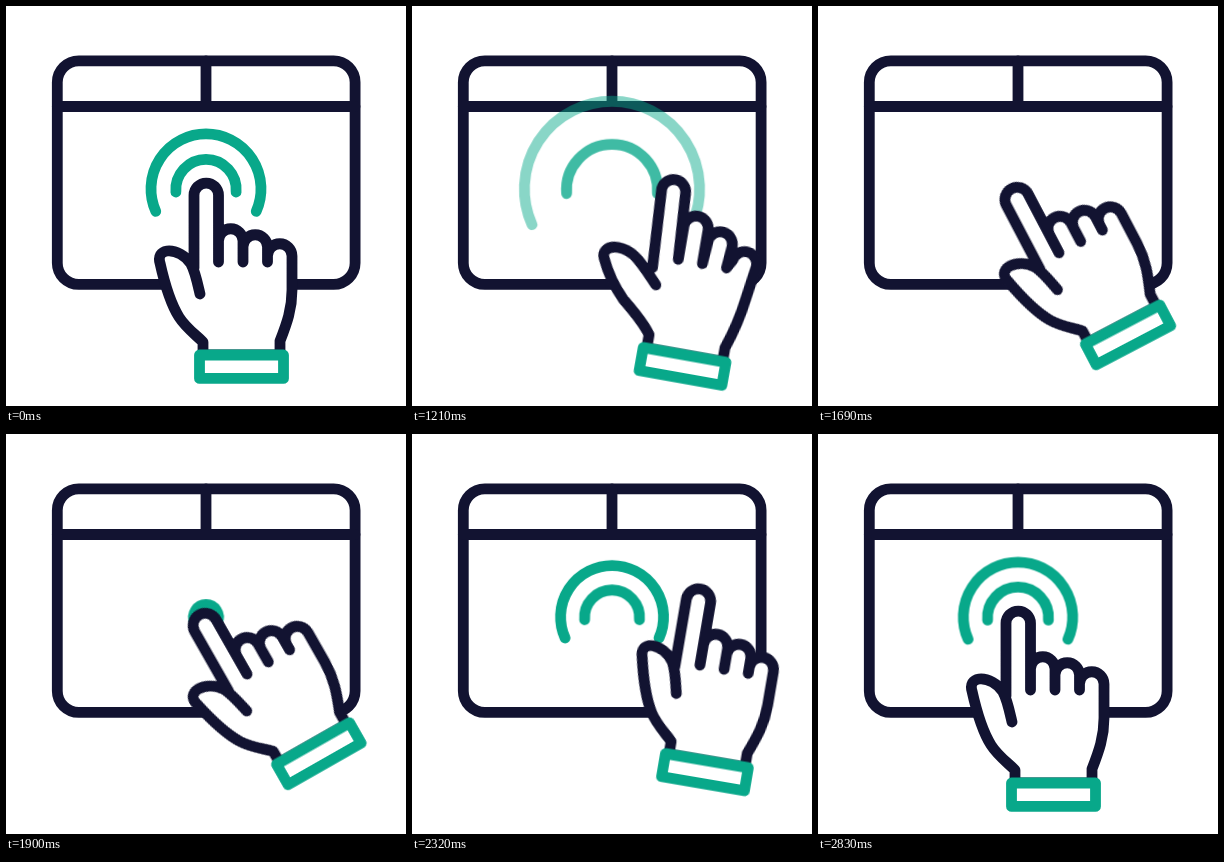
These frames come from a looping animation (400x400 px, 3.04 s). An HTML page without scripts:

```html
<!DOCTYPE html>
<html lang="en">
<head>
<meta charset="utf-8">
<title>Tap on a window</title>
<style>
html, body { margin: 0; width: 100%; height: 100%; overflow: hidden; background: #fff; }
svg { display: block; width: 100%; height: 100%; }

.ink, .wave {
  fill: none;
  stroke: #121331;
  stroke-width: 10.8;
  stroke-linecap: round;
  stroke-linejoin: round;
}
.wave, .cuff { stroke: #08a88a; }
.skin { fill: #fff; }

.wave {
  vector-effect: non-scaling-stroke;
  transform-origin: 200px 183px;
}
.outer { animation: outer 3040ms infinite, outer-fade 3040ms linear infinite; }
.inner { animation: inner 3040ms infinite, inner-fade 3040ms linear infinite; }

.hand {
  transform-origin: 235.5px 360.5px;
  animation: move 3040ms cubic-bezier(.33, 0, .67, 1) infinite;
}
.palm {
  --rest: path("M194 288C191 275 189 265 185 258C180 250 170 244 161 245C155 246 152 250 154 257C158 275 163 295 173 311C180 322 190 329 197 336L197 349L274 349L274 335C281 317 286 303 286 284L286 250A12.2 12.2 0 0 0 261.5 250L261.5 256L261.5 241A12.2 12.2 0 0 0 237 241L237 256L237 235A12.2 12.2 0 0 0 212.5 235L212.5 256L212.5 189.3A12.2 12.2 0 0 0 188 189.3L188 262");
  --press: path("M194 288C191 275 189 265 185 258C180 250 170 244 161 245C155 246 152 250 154 257C158 275 163 295 173 311C180 322 190 329 197 336L197 349L274 349L274 335C281 317 286 303 286 284L286 250A12.2 12.2 0 0 0 261.5 250L261.5 256L261.5 241A12.2 12.2 0 0 0 237 241L237 256L237 235A12.2 12.2 0 0 0 212.5 235L212.5 256L212.5 196.5A12.2 12.2 0 0 0 188 196.5L188 262");
  --open: path("M195.6 283C185 279 172 272 163 267C155 263 145 261.5 137 263C128 265 124 271 128 277C136 287 148 294 160 301C175 309 188 320 197 335L197 349L274 349L274 335C279 318 282 300 286 281L294 251A12.2 12.2 0 0 0 270 245L261.5 256L264.5 230A12.2 12.2 0 0 0 240 226L237 256L236.5 213A12.2 12.2 0 0 0 212 212L212.5 256L204.7 191A12.2 12.2 0 0 0 180.5 189L189 274");
  d: var(--rest);
  animation: flex 3040ms cubic-bezier(.33, 0, .67, 1) infinite;
}

@keyframes move {
  0%, 32.89% { transform: translate(0, 0) rotate(0deg); }
  45.72%, 48.36% { transform: translate(62.5px, -.5px) rotate(18deg); }
  56%, 59.2% { transform: translate(74.5px, -32px) rotate(-28deg); }
  65.5%, 69.41% { transform: translate(79.5px, -48.5px) rotate(-31deg); }
  76.32%, 77.6% { transform: translate(57.5px, -22.5px) rotate(9.7deg); }
  92.76%, 100% { transform: translate(0, 0) rotate(0deg); }
}
@keyframes flex {
  0%, 32.89% { d: var(--rest); }
  45.72%, 48.36% { d: var(--open); }
  55.6%, 59.2% { d: var(--rest); }
  65.5%, 69.41% { d: var(--press); }
  84%, 100% { d: var(--rest); }
}

/* ripples spread away, then spring back on the tap */
@keyframes outer {
  0%, 32.89% { transform: scale(1); animation-timing-function: cubic-bezier(.3, .4, .7, 1); }
  46.4% { transform: scale(1.89); animation-timing-function: step-end; }
  61.8% { transform: scale(.05); animation-timing-function: ease-out; }
  68.8% { transform: scale(1.1); animation-timing-function: ease-in-out; }
  69.41% { transform: scale(1.09); animation-timing-function: ease-in-out; }
  76.32% { transform: scale(.936); animation-timing-function: ease-in-out; }
  85% { transform: scale(1.01); animation-timing-function: ease-in-out; }
  93.1% { transform: scale(.994); }
  100% { transform: scale(1); }
}
@keyframes inner {
  0%, 37.17% { transform: scale(1); animation-timing-function: cubic-bezier(.3, .4, .7, 1); }
  49.67% { transform: scale(2.76); animation-timing-function: step-end; }
  61.8% { transform: scale(.05); animation-timing-function: ease-out; }
  68.8% { transform: scale(1.2); animation-timing-function: ease-in-out; }
  69.41% { transform: scale(1.19); animation-timing-function: ease-in-out; }
  76.32% { transform: scale(.91); animation-timing-function: ease-in-out; }
  85% { transform: scale(1.03); animation-timing-function: ease-in-out; }
  93.1% { transform: scale(1.01); }
  100% { transform: scale(1); }
}
@keyframes outer-fade {
  0%, 32.89% { opacity: 1; }
  46.2%, 61.8% { opacity: 0; }
  61.9%, 100% { opacity: 1; }
}
@keyframes inner-fade {
  0%, 37.17% { opacity: 1; }
  49.3%, 61.8% { opacity: 0; }
  61.9%, 100% { opacity: 1; }
}
</style>
</head>
<body>
<svg viewBox="0 0 400 400">
  <g class="ink">
    <rect x="51.3" y="54.8" width="297.8" height="223.6" rx="21.5"/>
    <path d="M51.3 100.5H349M200 55V100"/>
  </g>
  <path class="wave outer" d="M149.8 205.4A55 55 0 1 1 250.2 205.4"/>
  <path class="wave inner" d="M169.9 186A30.2 30.2 0 1 1 230.1 186"/>
  <g class="hand">
    <path class="ink skin palm"/>
    <rect class="ink skin cuff" x="193.5" y="349" width="84" height="23.4"/>
  </g>
</svg>
</body>
</html>
```
